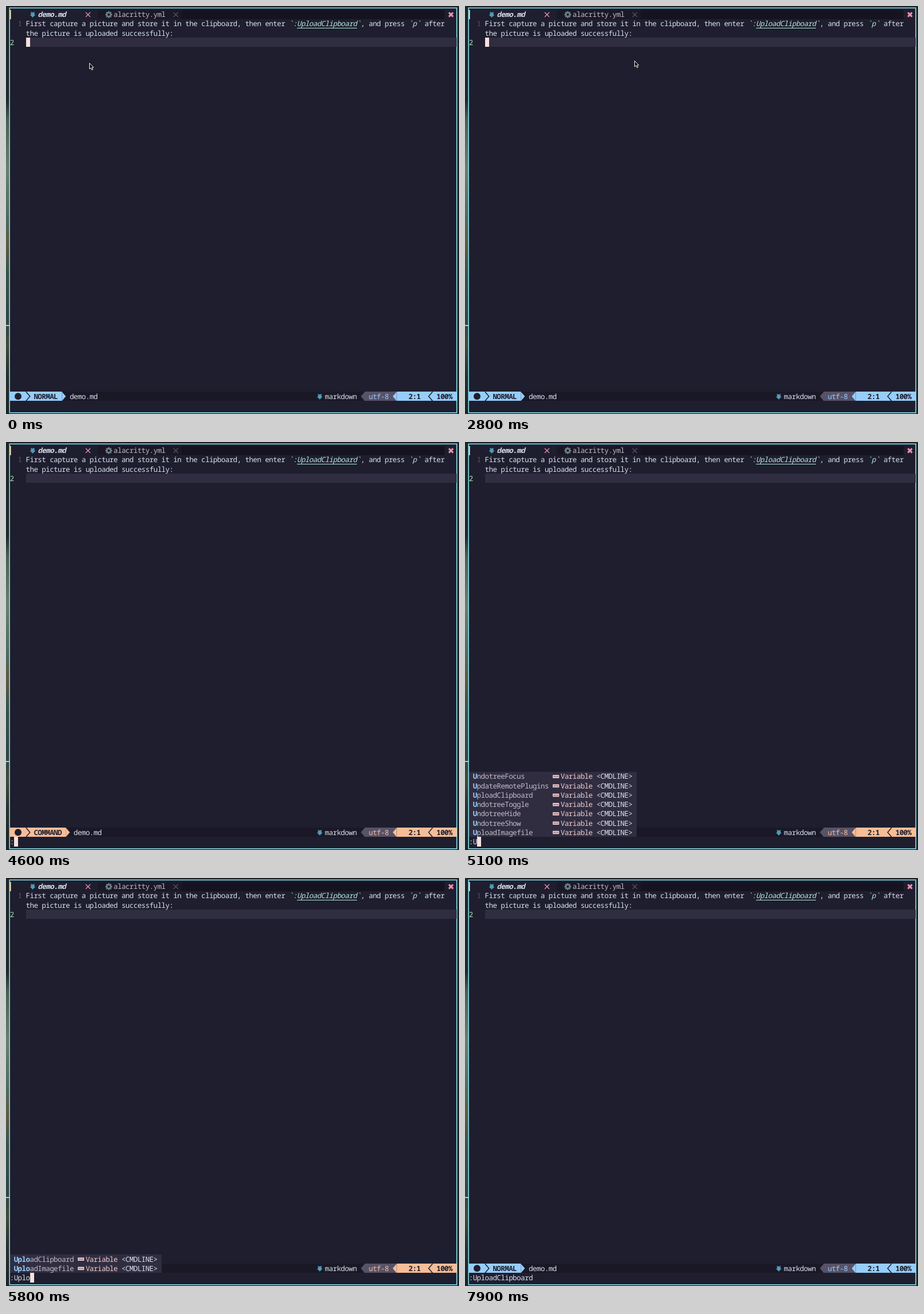
An HTML page with a canvas that plays this animation: 789x710 px, repeating every 8 s.

```html
<!DOCTYPE html>
<html lang="en">
<head>
<meta charset="utf-8">
<title>Upload from clipboard</title>
<style>
  html, body { margin: 0; width: 100%; height: 100%; overflow: hidden; background: #1b2629; }
  canvas { display: block; }
</style>
</head>
<body>
<canvas id="stage" width="789" height="710"></canvas>
<script>
const ctx = document.getElementById('stage').getContext('2d');
const LOOP = 8000, LEFT = 7, TOP = 6.6, CELL_W = 6.944, CELL_H = 16.21;
const C = {
  bg: '#1e1e2e', bar: '#1a1826', fill: '#161320', line: '#302d41', grey: '#575268',
  text: '#d9e0ee', soft: '#c3bac6', blue: '#96cdfb', peach: '#f8bd96', teal: '#b5e8e0',
  red: '#f28fad', rose: '#f5e0dc', pink: '#f2cdcd', green: '#abe9b3', border: '#89dceb',
  file: '#519aba', gear: '#6d8086', yellow: '#fae3b0'
};
const STATUS = 41, CMD = 42;

const COMMANDS = ['UndotreeFocus', 'UpdateRemotePlugins', 'UploadClipboard', 'UndotreeToggle',
  'UndotreeHide', 'UndotreeShow', 'UploadImagefile'];

// Command line over time: typed text, completion query, highlighted entry
const STEPS = [
  { at: 4600, cmd: ':' },
  { at: 5100, cmd: ':U', query: 'U' },
  { at: 5300, cmd: ':Up', query: 'U' },
  { at: 5400, cmd: ':Up', query: 'Up' },
  { at: 5600, cmd: ':Upl', query: 'Upl' },
  { at: 5800, cmd: ':Uplo', query: 'Uplo' },
  { at: 6400, cmd: ':UploadClipboard', query: 'Uplo', selected: 0 },
  { at: 6700, cmd: ':UploadClipboard' },
  { at: 7200, cmd: ':UploadClipboard', done: true }
];

const colX = col => LEFT + col * CELL_W;
const rowY = row => TOP + row * CELL_H;

function cells(col, row, count, color) {
  const x = Math.round(colX(col)), y = Math.round(rowY(row));
  ctx.fillStyle = color;
  ctx.fillRect(x, y, Math.round(colX(col + count)) - x, Math.round(rowY(row + 1)) - y);
}

// Text on the terminal's cell grid
function write(str, col, row, color = C.text, style = '') {
  ctx.font = `${style} 12.5px "Noto Sans Mono", "DejaVu Sans Mono", monospace`;
  ctx.letterSpacing = '0px';
  const gap = CELL_W - ctx.measureText('0').width;
  ctx.letterSpacing = gap + 'px';
  ctx.fillStyle = color;
  ctx.fillText(str, colX(col) + gap / 2, rowY(row) + 12.5);
}

function polyline(points, color, width) {
  ctx.beginPath();
  points.forEach(([x, y]) => ctx.lineTo(x, y));
  if (width) {
    ctx.strokeStyle = color;
    ctx.lineWidth = width;
    ctx.stroke();
  } else {
    ctx.fillStyle = color;
    ctx.fill();
  }
}

// Arrowhead one cell wide; dir 1 points right, -1 left
function chevron(col, dir, color, width) {
  const x0 = colX(dir > 0 ? col : col + 1), y = rowY(STATUS);
  polyline([[x0, y], [x0 + dir * CELL_W, y + CELL_H / 2], [x0, y + CELL_H]], color, width);
}

function cross(x, y, r, color, width) {
  polyline([[x - r, y - r], [x + r, y + r]], color, width);
  polyline([[x + r, y - r], [x - r, y + r]], color, width);
}

function fileIcon(col, row) {
  const x = colX(col) + 4.8, y = rowY(row) + 3.5;
  polyline([[x - 3, y], [x, y + 1.5], [x + 3, y], [x + 3, y + 5], [x + 5, y + 5],
    [x, y + 10], [x - 5, y + 5], [x - 3, y + 5]], C.file);
}

function gear(x, y) {
  ctx.strokeStyle = C.gear;
  ctx.lineWidth = 2.6;
  ctx.beginPath();
  ctx.arc(x, y, 3.4, 0, 7);
  ctx.stroke();
  for (let i = 0; i < 8; i++) {
    const dx = Math.cos(i * Math.PI / 4), dy = Math.sin(i * Math.PI / 4);
    polyline([[x + dx * 4, y + dy * 4], [x + dx * 6, y + dy * 6]], C.gear, 2.4);
  }
}

function wallpaper() {
  const side = ctx.createLinearGradient(0, 0, 0, 710);
  [[0, '#1b2629'], [.23, '#1c2a2a'], [.28, '#476052'], [.4, '#66806d'], [.52, '#4c6b5c'],
    [.58, '#5c5b40'], [.66, '#34524a'], [.77, '#2d4643'], [.83, '#3f4a38'], [.9, '#24332f'],
    [1, '#182426']].forEach(([at, color]) => side.addColorStop(at, color));
  ctx.fillStyle = '#1b2629';
  ctx.fillRect(0, 0, 789, 710);
  ctx.fillStyle = side;
  ctx.fillRect(0, 0, 6, 710);
  ctx.fillStyle = '#b9c4bd';
  ctx.fillRect(0, 555, 6, 2);
}

function editor() {
  ctx.fillStyle = C.bg;
  ctx.fillRect(6, 4, 779, 704);
  ctx.strokeStyle = C.border;
  ctx.lineWidth = 1.6;
  ctx.strokeRect(6.2, 3.4, 779, 704.4);

  cells(22, 0, 21, C.bar);
  cells(43, 0, 66, C.fill);
  ctx.fillStyle = C.yellow;
  ctx.fillRect(7, 7, 1.6, 16);
  fileIcon(5, 0);
  write('demo.md', 7, 0, C.text, 'italic bold');
  cross(142.8, 15, 4, C.red, 1.2);
  gear(179, 15);
  write('alacritty.yml', 26, 0, C.soft);
  cross(295.7, 15, 4, C.grey, 1.2);
  cross(775, 15, 3.6, C.red, 3);

  write('1', 2, 1, C.grey);
  write('First capture a picture and store it in the clipboard, then enter', 4, 1);
  write('`:UploadClipboard`', 70, 1, C.teal, 'italic');
  ctx.fillRect(colX(72), 38, 15 * CELL_W, 1);
  write(', and press', 88, 1);
  write('`p`', 100, 1, C.teal, 'italic');
  write('after', 104, 1);
  write('the picture is uploaded successfully:', 4, 2);
  cells(4, 3, 108, C.line);
  write('2', 0, 3, C.green);
}

function statusLine(mode, accent) {
  const end = 7 + mode.length;
  cells(0, STATUS, 112, C.bar);
  cells(0, STATUS, end, accent);
  ctx.fillStyle = C.bg;
  ctx.beginPath();
  ctx.arc(21, rowY(STATUS) + 8.1, 6, 0, 7);
  ctx.fill();
  chevron(4, 1, C.bg, 1.5);
  write(mode, 6, STATUS, C.bg, 'bold');
  chevron(end, 1, accent);
  write('demo.md', end + 2, STATUS);

  fileIcon(77, STATUS);
  write('markdown', 79, STATUS);
  chevron(88, -1, C.grey);
  cells(89, STATUS, 8, C.grey);
  write('utf-8', 90, STATUS, accent);
  chevron(96, -1, accent);
  cells(97, STATUS, 15, accent);
  write('2:1', 100, STATUS, C.bg, 'bold');
  chevron(105, -1, C.bg, 1.5);
  write('100%', 107, STATUS, C.bg, 'bold');
}

// Indexes of the query's letters in a word, or null when it does not match
function fuzzy(word, query) {
  const hits = [];
  for (const ch of query) {
    const i = word.indexOf(ch, hits.length ? hits.at(-1) + 1 : 0);
    if (i < 0) return null;
    hits.push(i);
  }
  return hits;
}

function menu(query, selected) {
  const words = COMMANDS.filter(word => fuzzy(word, query))
    .sort((a, b) => b.startsWith(query) - a.startsWith(query));
  const kind = Math.max(...words.map(word => word.length)) + 2;
  words.forEach((word, i) => {
    const row = CMD - words.length + i, hits = fuzzy(word, query);
    cells(0, row, kind + 21, i === selected ? C.grey : C.line);
    [...word].forEach((ch, k) => hits.includes(k)
      ? write(ch, 1 + k, row, C.blue, 'bold')
      : write(ch, 1 + k, row, C.soft));
    const x = colX(kind), y = rowY(row) + 5.5;
    ctx.fillStyle = C.pink;
    ctx.fillRect(x, y, 11, 5.5);
    ctx.fillStyle = C.line;
    for (let dot = 0; dot < 3; dot++) ctx.fillRect(x + 1.7 + dot * 3, y + 2, 1.6, 1.6);
    write('Variable', kind + 2, row, C.pink);
    write('<CMDLINE>', kind + 11, row);
  });
}

const SHAPES = {
  arrow: new Path2D('M.5 .5V10.5L2.8 8.6L4.6 12.3L6.3 11.5L4.7 7.9H7.5Z'),
  corner: new Path2D('M-2.5 -9.5H-.5V-.5H-9.5V-3H-2.5Z'),
  beam: new Path2D('M-4.5 -8.5H-1L0 -7.5L1 -8.5H4.5V-6.5H1V6.5H4.5V8.5H1L0 7.5L-1 8.5H-4.5V6.5H-1V-6.5H-4.5Z')
};

const ease = p => p * p * (3 - 2 * p);
const between = (a, b, p) => [0, 1].map(i => a[i] + (b[i] - a[i]) * ease(p));

// The pointer is sampled ten times a second
function pointer(t) {
  const now = Math.floor(t / 100) * 100;
  if (now < 300) return ['arrow', [144.5, 98.5]];
  if (now < 1600) {
    const p = Math.min(1, Math.max(0, (now - 600) / 800));
    return ['arrow', between([144.5, 94.5], [22, 15], p)];
  }
  if (now < 2800) return ['corner', between([36, 25], [401, 68], Math.min(1, (now - 1600) / 800))];
  if (now < 2900) return ['arrow', [294.5, 94.5]];
  if (now < 3000) return ['beam', [205, 111]];
  if (now < 3100) return ['beam', [115, 92]];
  if (now < 4400) return ['beam', [91.5, 76]];
  return null;
}

function drawPointer(t) {
  const state = pointer(t);
  if (!state) return;
  const [shape, [x, y]] = state;
  ctx.save();
  ctx.translate(Math.round(x), Math.round(y));
  ctx.fillStyle = '#000';
  ctx.fill(SHAPES[shape]);
  ctx.strokeStyle = '#fff';
  ctx.lineWidth = 1;
  ctx.stroke(SHAPES[shape]);
  ctx.restore();
}

function textCursor(t) {
  if (t >= 300 && t < 2800) {
    ctx.strokeStyle = C.rose;
    ctx.lineWidth = 1;
    ctx.strokeRect(35.5, 55.5, 6, 16);
  } else if (t < 3300 || (t >= 4100 && t < 4600) || (t >= 7200 && t < 7900)) {
    cells(4, 3, 1, C.rose);
  }
}

function draw(t) {
  const step = STEPS.findLast(s => t >= s.at);
  const typing = step && !step.done;
  wallpaper();
  editor();
  statusLine(typing ? 'COMMAND' : 'NORMAL', typing ? C.peach : C.blue);
  if (step) write(step.cmd, 0, CMD);
  if (typing) cells(step.cmd.length, CMD, 1, C.rose);
  if (step?.query) menu(step.query, step.selected);
  textCursor(t);
  drawPointer(t);
}

ctx.textRendering = 'geometricPrecision';
const start = performance.now();
function tick() {
  draw((performance.now() - start) % LOOP);
  requestAnimationFrame(tick);
}
tick();
</script>
</body>
</html>
```
